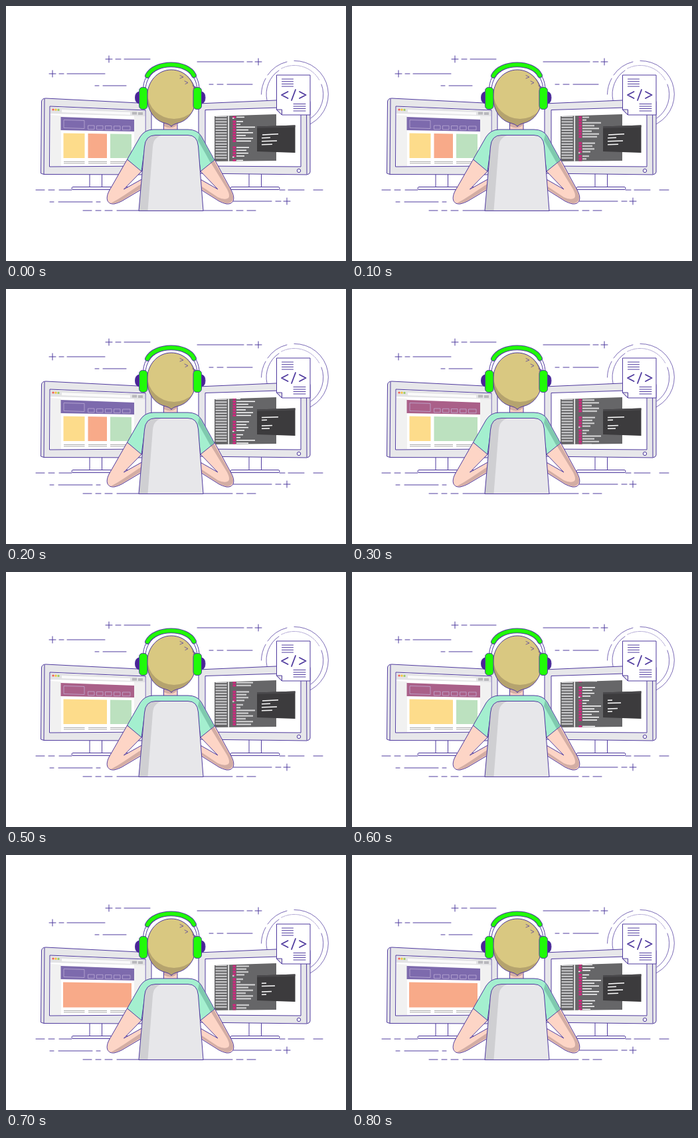
These frames come from a looping animation (512 px wide and 384 px high, 0.9 s). An HTML page:

```html
<!DOCTYPE html>
<html lang="en">
<head>
<meta charset="utf-8">
<title>Developer at work</title>
<style>
  html, body { margin: 0; width: 100%; height: 100%; overflow: hidden; background: #fff; }
  svg { display: block; width: 100vw; height: 100vh; }
  .ink { fill: none; stroke: #4f3a9e; stroke-width: 1; stroke-linecap: round; stroke-linejoin: round; }
  .thin { stroke-width: .75; }
  .line { stroke: #4f3a9e; stroke-width: 1; stroke-linejoin: round; }
  .shell { fill: #e7e7ea; }
  .skin { fill: #fdd5c6; }
  .skin-shade { fill: #d3ada4; }
  .mint { fill: #a4efcf; }
  .green { fill: #20fb08; }
  .yellow { fill: #fddc8b; }
  .orange { fill: #f8aa89; }
  .leaf { fill: #bce1bf; }
  .scroll { animation: scroll .9s steps(9) infinite; }
  .header { animation: header .9s step-end infinite; }
  .three { animation: three .9s step-end infinite; }
  .wide-leaf { animation: wide-leaf .9s step-end infinite; }
  .wide-yellow { animation: wide-yellow .9s step-end infinite; }
  .wide-orange { animation: wide-orange .9s step-end infinite; }
  .output-a { animation: output-a .9s step-end infinite; }
  .output-b { animation: output-b .9s step-end infinite; }
  .output-c { animation: output-c .9s step-end infinite; }
  @keyframes scroll { to { transform: translateY(-58.5px); } }
  @keyframes header { 0%, 77.75% { fill: #7d6aad; } 33.3% { fill: #aa6089; } }
  @keyframes three { 0% { visibility: visible; } 33.3%, 100% { visibility: hidden; } }
  @keyframes wide-leaf { 0%, 55.5% { visibility: hidden; } 33.3% { visibility: visible; } }
  @keyframes wide-yellow { 0%, 77.75% { visibility: hidden; } 55.5% { visibility: visible; } }
  @keyframes wide-orange { 0% { visibility: hidden; } 77.75%, 100% { visibility: visible; } }
  @keyframes output-a { 0%, 44.4%, 88.85% { visibility: visible; } 22.2%, 66.6% { visibility: hidden; } }
  @keyframes output-b { 0%, 44.4% { visibility: hidden; } 22.2% { visibility: visible; } }
  @keyframes output-c { 0%, 88.85% { visibility: hidden; } 66.6% { visibility: visible; } }
</style>
</head>
<body>
<svg viewBox="0 0 512 384">
  <defs>
    <clipPath id="editor"><path d="M314 166L407 163V233L314 234Z"/></clipPath>
    <path id="head" d="M249 181Q246 178 240 176.500C223 173 212.500 156 212.500 137C212.500 113 229 96 249 96S286 113 286 137C286 156 275 173 258 176.500Q252 178 249 181Z"/>
    <clipPath id="hair"><use href="#head"/></clipPath>
  </defs>

  <!-- Background dashes -->
  <path class="ink" d="M150 80h10M155 75v10M165 80h8M178 80h39
    M65 102h10M70 97v10M80 102h7M92 102h57M134 120h6M146 120h35
    M288 84h70M363 84h8M375 84h10M380 79v10M306 118h6M318 118h9M333 118h38
    M45 277h13M64 277h9M80 277h19M412 277h8M425 277h24M463 277h14
    M66 295h6M79 295h51M136 295h6M342 294h58M406 294h8M418 294h10M423 289v10
    M116 308h13M135 308h8M149 308h11M167 308h174M347 308h10M363 308h13"/>
  <path class="ink thin" d="M434 82.500A50.500 50.500 0 0 1 452 180.500M423 84A50 50 0 0 0 394 104M391 109A50 50 0 0 0 384.500 133M386 143A50 50 0 0 0 400 169"/>
  <path class="ink thin" d="M411 97A43 43 0 0 0 393 142M396 152A43 43 0 0 0 410 168M475 118A43 43 0 0 1 459 169"/>
  <path class="ink thin" stroke-dasharray=".5 1.800" d="M415 94A43 43 0 0 1 472 112"/>

  <!-- Left monitor -->
  <path class="line" fill="#fff" d="M126 252h18.500v21H126Z"/>
  <rect class="line" fill="#fff" x="99" y="272.500" width="86" height="4" rx="2"/>
  <path class="line shell" d="M52.500 252L53.500 144Q54 139 60 139L219 147V254L57 253.500Z"/>
  <path class="ink" d="M58 140L57 253"/>
  <path class="line" fill="#fff" d="M66 151L210 157V241L65.500 242Z"/>
  <path fill="#f1f1f1" d="M67 164L83 165V241H67ZM193 165L209.500 166V240H193Z"/>
  <path fill="#e3e3e5" d="M67 152L209.500 158V166L67 162Z"/>
  <path fill="#fafafa" d="M84 156L187 160V164L84 160Z"/>
  <path fill="#b8b8bc" d="M190 159.500h7v4h-7ZM199 160h7v4h-7Z"/>
  <circle cx="71" cy="156" r="1.600" fill="#f15f50"/>
  <circle cx="75" cy="156.200" r="1.600" fill="#f5c33b"/>
  <circle cx="79" cy="156.400" r="1.600" fill="#99ca62"/>
  <path class="header" d="M82.500 167L193 171V189L82.500 187Z"/>
  <g fill="none" stroke="#c4b5db" stroke-width=".7">
    <path d="M87 171.500L118 172.500V184.500L87 183.500Z"/>
    <path d="M123.500 180h9.500v5.700h-9.500ZM136.500 180.300h9.500v5.700h-9.500ZM149.500 180.500h9.500v5.700h-9.500ZM162.500 180.800h9.500v5.700h-9.500ZM175.500 181h11.500v5.700h-11.500Z"/>
  </g>
  <g class="three">
    <path class="yellow" d="M86.500 191.500L118.500 192V229H86.500Z"/>
    <path class="orange" d="M123.500 192L152 192.500V229H123.500Z"/>
    <path class="leaf" d="M157 192.500L189 193V229H157Z"/>
  </g>
  <g class="wide-leaf">
    <path class="yellow" d="M86.500 191.500L118.500 192V229H86.500Z"/>
    <path class="leaf" d="M123.500 192L189 193V229H123.500Z"/>
  </g>
  <g class="wide-yellow">
    <path class="yellow" d="M86.500 191.500L152 192.500V229H86.500Z"/>
    <path class="leaf" d="M157 192.500L189 193V229H157Z"/>
  </g>
  <path class="wide-orange orange" d="M86 191.500L189 193V229.500H86Z"/>
  <path stroke="#aaa" stroke-width="1" d="M87 234.500h31.500M124 234.500h28M157 234.500h32M87 237h31.500M124 237h28M157 237h32"/>

  <!-- Right monitor -->
  <path class="line" fill="#fff" d="M366 252h18.500v21H366Z"/>
  <rect class="line" fill="#fff" x="338" y="272.500" width="74" height="4" rx="2"/>
  <path class="line shell" d="M290 147L452 140Q458 140 458 145V250Q458 253 453 254L290 252Z"/>
  <path class="ink" d="M452.500 141L453 253"/>
  <path class="line" fill="#fff" d="M300 156.500L444 152V242L300 241Z"/>
  <circle class="line" fill="#fff" cx="441" cy="248" r="2.700"/>
  <g clip-path="url(#editor)">
    <path fill="#666668" d="M314 162h93v73h-93Z"/>
    <g id="outline"></g>
    <g class="scroll" id="code"></g>
    <path fill="#fff" d="M334.500 162h1.500v73h-1.500Z"/>
  </g>
  <path fill="#3c3b3d" d="M378 181.500L435.500 179.500V221L378 219Z"/>
  <path fill="#4a494c" d="M378 181.500L435.500 179.500V182.500L378 184Z"/>
  <g fill="none" stroke="#fff" stroke-width="1.500">
    <path class="output-a" d="M386 194L410 192.800M385 198.800L398 198.200M385 203.800L408 203M385 208.800L401 208.200"/>
    <path class="output-b" d="M385 193.500L410 192.800M385 197.500L393 197.200M385 206L401 205.500M385 210.200L397 210"/>
    <path class="output-c" d="M385 193.200L392 193M385 197.600L405 197M385 206L400 205.500M385 210.200L392 210"/>
  </g>

  <!-- Code document -->
  <path class="line" fill="#fff" d="M407.500 104H458V164H415.500L407.500 156Z"/>
  <path class="line" fill="#e7e7ea" d="M407.500 156H415.500V164Z"/>
  <path class="ink" d="M415.500 110h17M415.500 113.700h17M415.500 117.400h17M415.500 121h17M433 147.500h18M433 151h18M433 154.500h18M433 158h18"/>
  <path class="ink" style="stroke-width:1.800" d="M424.500 129L415 134L424.500 139M436 126L430 142M442 129L451.500 134L442 139"/>

  <!-- Arms -->
  <path class="line skin" d="M182.500 231L155 279C149 291 153 299 163 298Q168 297 174 294L206 275V260L177.500 276L205 248Z"/>
  <path class="skin-shade" d="M163 297Q168 296 174 293L205 274V267L178 285Q169 291 158 297Z"/>
  <path class="line skin" d="M314 231L340 279C346 291 342 299 332 298Q327 297 321 294L291 275V260L319 276L292 248Z"/>
  <path class="skin-shade" d="M313 233L339.500 280C345 290 341 297 332 297Q327 296 321 293L292 274V270L319 288Q330 293 335 289Q338 286 333 276L308.500 236Z"/>

  <!-- Body and chair -->
  <path class="line skin" d="M237.500 172h20.500v19h-20.500Z"/>
  <path class="skin-shade" d="M238 173h19.500v6q-8 8-19.500 2Z"/>
  <path class="line mint" d="M222 186H274Q288 186 294 196L314 232L293 249L287 205H210L204 249L182.500 231L202 197Q209 186 222 186Z"/>
  <path fill="#7fc9ae" d="M291 193L313.500 232L308 236L289 202Z"/>
  <path class="shell" d="M200 308L208.500 212Q210 194.500 225 194.500H274Q288 194.500 289.500 211L297 308Z"/>
  <path fill="#cfcfd2" d="M200 308L208.500 212Q210 194.500 225 194.500H236Q222 197 221 212L213.500 308Z"/>
  <path class="ink" d="M200 308L208.500 212Q210 194.500 225 194.500H274Q288 194.500 289.500 211L297 308Z"/>

  <!-- Head and headphones -->
  <path class="line" fill="#fff" d="M206.500 126C207 73 291 73 291 126H288C286 79 212 79 210 126Z"/>
  <g clip-path="url(#hair)">
    <path fill="#b5a36e" d="M205 90h90v95h-90Z"/>
    <ellipse cx="253" cy="131" rx="40" ry="39" fill="#d9c881"/>
    <path fill="#b5a36e" d="M259 97Q277 105 282 123L287 122V96Z"/>
  </g>
  <use href="#head" class="ink"/>
  <path class="ink" style="stroke-width:7.800" d="M213 105C224 83 273 83 283 104.500"/>
  <path class="ink" style="stroke:#20fb08;stroke-width:5.800" d="M213 105C224 83 273 83 283 104.500"/>
  <path class="line" fill="#4b2397" d="M202 129Q194.500 129 194.500 138T202 147ZM293 129Q300 129 300 138T293 147Z"/>
  <rect class="line green" x="200.500" y="122.500" width="12.500" height="33" rx="5"/>
  <rect class="line green" x="282" y="122.500" width="12.500" height="33" rx="5"/>
  <path class="ink thin" d="M262 104.500L267 107L262 109M269 113L274 115.500L270 117.500M281 120L286 122L282 124"/>
</svg>
<script>
  const period = 58.5;
  const widths = [10, 6, 28, 18, 25, 14, 25, 22, 19, 15, 18, 12];
  const bar = (x, y, width, color, height = 1.5) =>
    `<rect x="${x}" y="${y - height / 2}" width="${width}" height="${height}" fill="${color}"/>`;

  let rows = "";
  for (let block = 0; block < 3; block++) {
    const top = 174 + (block - 1) * period;
    widths.forEach((width, i) => {
      const y = top + (i < 8 ? i * 4.2 : 39 + (i - 8) * 4.3);
      rows += bar(341.5, y, 4.5, "#d3257f", 3) + bar(347, y, width, "#fff");
    });
    rows += bar(341, top + 53.5, 2.5, "#fff");
  }
  document.getElementById("code").innerHTML = rows;

  let entries = "";
  for (let i = 0; i < 16; i++) entries += bar(315.5, 166.1 + i * 4.18, 17, "#cfcfd1", 2);
  document.getElementById("outline").innerHTML = entries;
</script>
</body>
</html>
```
